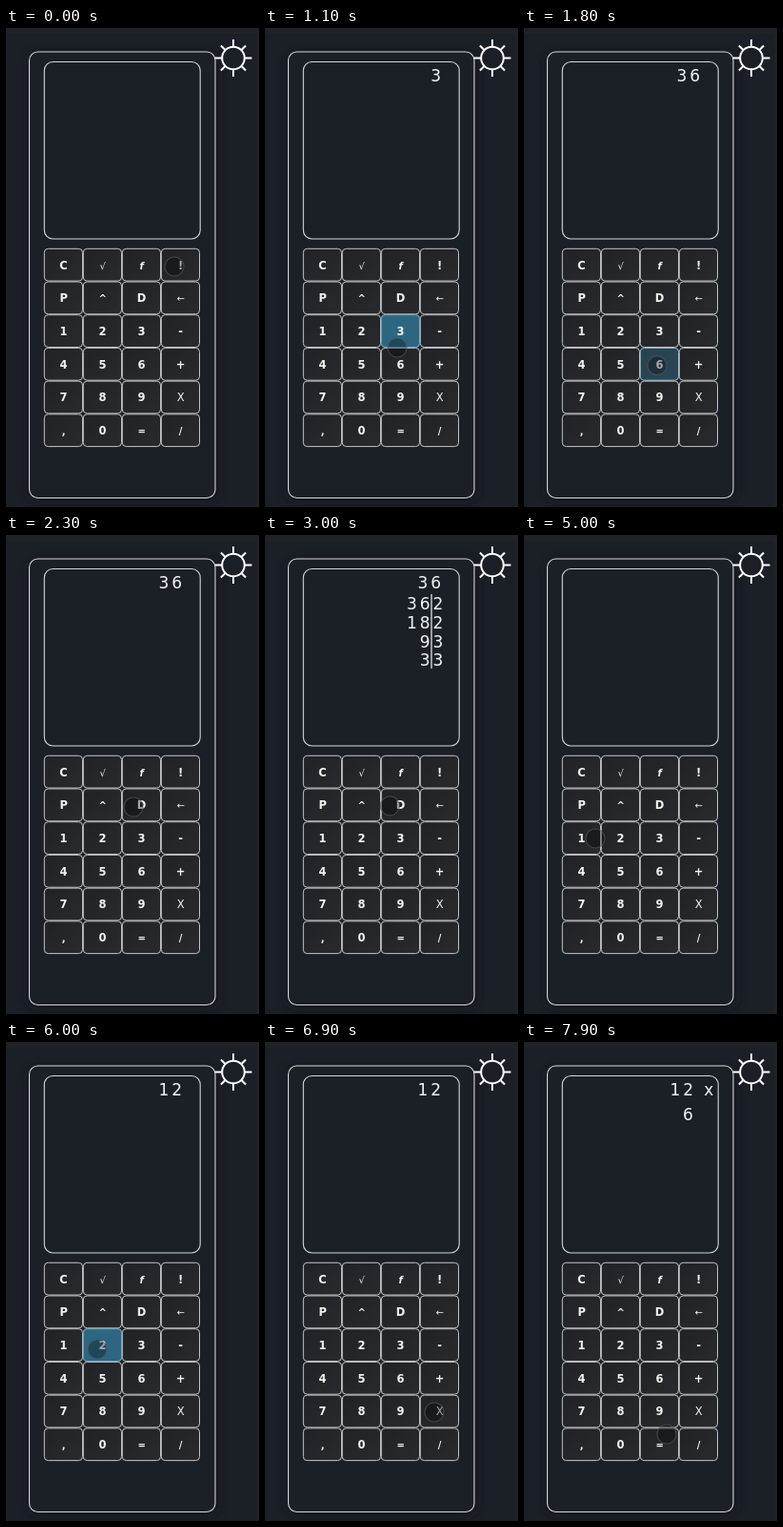
An HTML page for the animation above (8 s loop, 266 by 502 pixels).

```html
<!DOCTYPE html>
<html lang="en">
<head>
<meta charset="utf-8">
<title>Calculator</title>
<style>
  html, body { margin: 0; width: 100%; height: 100%; overflow: hidden; background: #1b2027; }
  svg { display: block; width: 266px; height: 502px; }
  text { fill: #f1f1f1; font-family: "DejaVu Sans", sans-serif; }
  .label { font-size: 11.5px; font-weight: bold; text-anchor: middle; }
  .small { font-size: 10px; }
  .thin { font-weight: normal; }
  .func { font-style: italic; }
  .row { font-size: 17px; letter-spacing: 2.9px; white-space: pre; }
</style>
</head>
<body>
<svg id="stage" viewBox="0 0 266 502" xmlns="http://www.w3.org/2000/svg">
  <defs>
    <linearGradient id="keyFill" x1="0" y1="0" x2="1" y2="1">
      <stop offset="0" stop-color="#202226"/>
      <stop offset="1" stop-color="#2a2a2d"/>
    </linearGradient>
    <filter id="soft" x="-20%" y="-10%" width="140%" height="120%">
      <feGaussianBlur stdDeviation="5"/>
    </filter>
  </defs>
  <rect width="266" height="502" fill="#1b2027"/>
  <rect x="22" y="26" width="202" height="470" rx="10" fill="#15181d" opacity=".65" filter="url(#soft)"/>
  <path d="M0 0H266V502H263V6H0Z" fill="#212226"/>
  <rect x="24.5" y="25" width="195.5" height="467.5" rx="9" fill="#1b2027" stroke="#d5d6d8" stroke-width="1.1"/>
  <rect x="40.3" y="35.5" width="163.9" height="185.5" rx="9" fill="#1b2027" stroke="#d5d6d8" stroke-width="1.1"/>
  <g id="sun" transform="translate(239 31.5)" stroke="#fff" stroke-width="2" fill="none">
    <circle r="11.8"/>
  </g>
  <g id="keys"></g>
  <g id="screen"></g>
  <path id="divider" d="M175 62V140" stroke="#f1f1f1" stroke-width="1.2"/>
  <circle id="cursor" r="10" fill="#000" fill-opacity=".3" stroke="#55565a" stroke-opacity=".65" stroke-width="1.2"/>
</svg>
<script>
const LOOP = 8000;
const NS = "http://www.w3.org/2000/svg";
const $ = id => document.getElementById(id);

function add(parent, tag, attrs, content = "") {
  const node = document.createElementNS(NS, tag);
  for (const name in attrs) node.setAttribute(name, attrs[name]);
  node.textContent = content;
  parent.appendChild(node);
  return node;
}

for (let i = 0; i < 8; i++) {
  add($("sun"), "path", {
    d: i % 2 ? "M12 0H18.5" : "M12 0H19.5",
    transform: `rotate(${i * 45})`
  });
}

// Keypad
const labels = "C√f!P^D←123-456+789X,0=/";
const styles = { "√": "small thin", "←": "small thin", "f": "small func", "^": "small", ",": "small", "=": "small", "/": "small", "X": "thin" };
const glows = {};
[...labels].forEach((label, i) => {
  const col = i % 4, row = Math.floor(i / 4);
  const x = 40.3 + col * 41, y = 231.3 + row * 34.7;
  const box = { x, y, width: 40.2, height: 33.8, rx: 4 };
  add($("keys"), "rect", { ...box, fill: "url(#keyFill)", stroke: "#c3c4c6" });
  glows[label] = add($("keys"), "rect", { ...box, fill: "#2d6681", stroke: "#6aa5bd", opacity: 0 });
  add($("keys"), "text", { x: x + 20.3, y: y + 21.2, class: "label " + (styles[label] || "") }, label);
});

const presses = [
  ["3", 960], ["6", 1580], ["D", 2480], ["C", 4060],
  ["1", 5160], ["2", 5880], ["X", 7000], ["6", 7500]
];

// Each view: start time, then rows of [x, baseline, text]
const views = [
  [0],
  [980, [174.3, 56, "3"]],
  [1600, [160.5, 56, "36"]],
  [2500, [160.5, 56, "36"], [149, 78, "362"], [149, 98, "182"], [162.7, 117.5, "93"], [162.7, 137, "33"]],
  [4080],
  [5180, [174.3, 56, "1"]],
  [5900, [160.5, 56, "12"]],
  [7020, [153.5, 56, "12 x"]],
  [7520, [153.5, 56, "12 x"], [167, 82, "6"]]
];
const FACTORS = 3;

const screens = views.map(([, ...rows]) => {
  const group = add($("screen"), "g", {});
  rows.forEach(([x, y, value]) => add(group, "text", { x, y, class: "row" }, value));
  return group;
});

const path = [
  [0, 177, 250], [850, 143, 325], [1100, 139, 335], [1450, 140, 354], [1780, 140, 354],
  [2300, 134, 285], [2900, 134, 285], [3800, 58, 250], [4300, 58, 250],
  [5000, 75, 318], [5150, 71, 321], [5350, 72, 321], [5700, 96, 322], [6100, 96, 322],
  [6850, 178, 388], [7120, 178, 388], [7430, 150, 358], [7600, 150, 358],
  [7900, 150, 411], [8000, 150, 414]
];

const clamp = v => Math.max(0, Math.min(1, v));
const ease = v => v * v * (3 - 2 * v);

function cursorAt(t) {
  const i = path.findIndex(p => p[0] > t);
  const [t0, x0, y0] = path[i - 1], [t1, x1, y1] = path[i];
  const k = ease((t - t0) / (t1 - t0));
  return [x0 + (x1 - x0) * k, y0 + (y1 - y0) * k];
}

function glow(age) {
  return age < 0 ? 0 : clamp(age / 40) * clamp((260 - age) / 80);
}

function draw(t) {
  const levels = {};
  presses.forEach(([key, start]) => {
    levels[key] = Math.max(levels[key] || 0, glow(t - start));
  });
  for (const key in levels) glows[key].setAttribute("opacity", levels[key]);

  const current = views.filter(v => v[0] <= t).length - 1;
  screens.forEach((group, i) => group.setAttribute("visibility", i === current ? "visible" : "hidden"));
  $("divider").setAttribute("visibility", current === FACTORS ? "visible" : "hidden");

  const [x, y] = cursorAt(t);
  $("cursor").setAttribute("cx", x);
  $("cursor").setAttribute("cy", y);
}

const begin = performance.now();
function tick() {
  draw((performance.now() - begin) % LOOP);
  requestAnimationFrame(tick);
}
tick();
</script>
</body>
</html>
```
